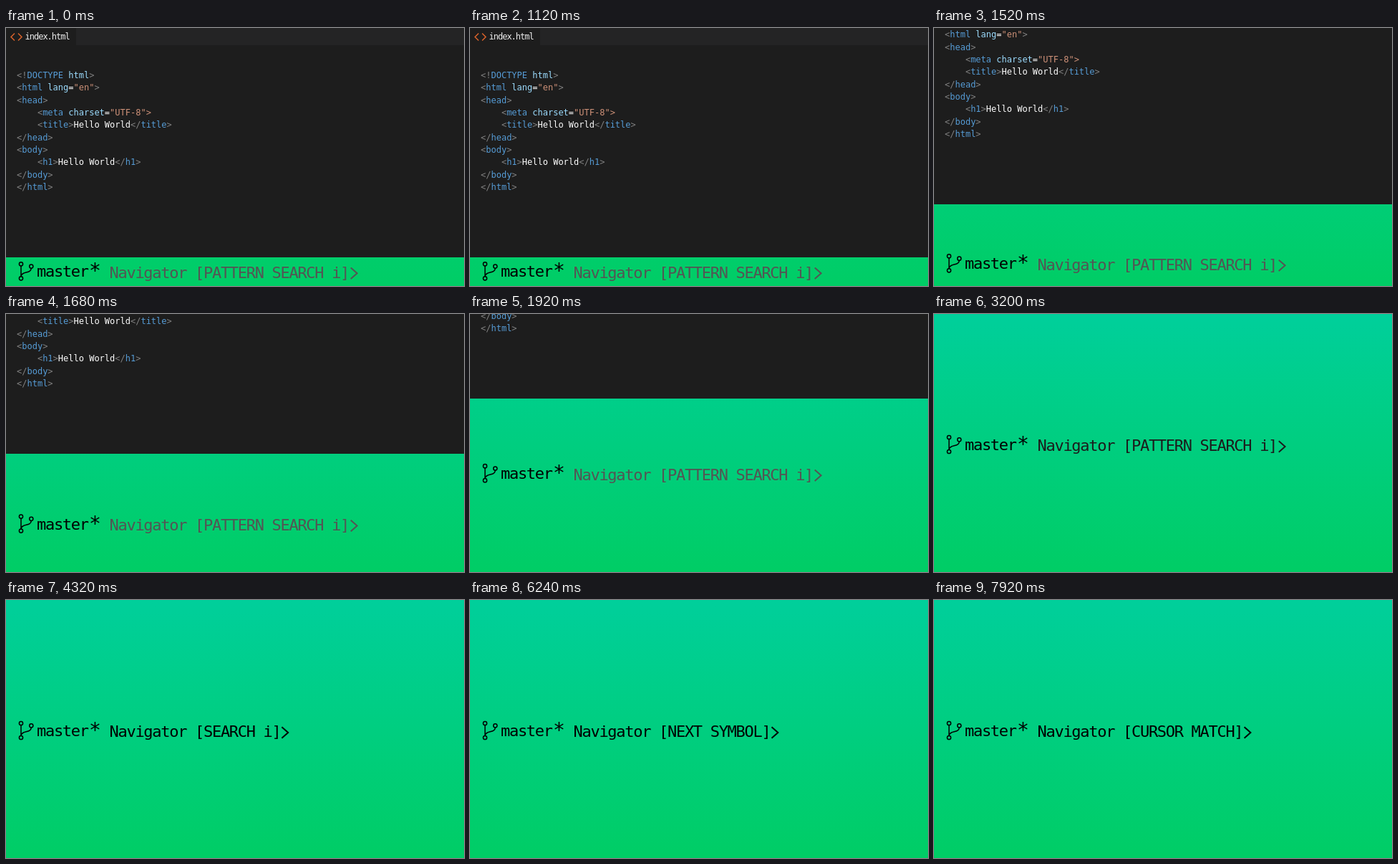
These frames come from a looping animation (640x360 px, 8000 ms). An HTML page:

```html
<!DOCTYPE html>
<html lang="en">
<head>
<meta charset="UTF-8">
<title>Editor status bar</title>
<style>
  html, body { margin: 0; width: 100%; height: 100%; overflow: hidden; background: #00cd65; }
  svg { display: block; width: 640px; height: 360px; }
  text { font-family: "DejaVu Sans Mono", monospace; white-space: pre; }
  .code { font-size: 12px; }
  .tab { font-size: 12px; letter-spacing: -1px; fill: #f0f0f0; }
  .label { font-size: 22px; letter-spacing: -1.3px; }
  .star { font-size: 28px; text-anchor: middle; }
  .line { fill: none; stroke-width: 1.5; }
  .p { fill: #808080; }
  .t { fill: #569cd6; }
  .a { fill: #9cdcfe; }
  .s { fill: #ce9178; }
  .w { fill: #fff; }
</style>
</head>
<body>
<svg viewBox="0 0 640 360">
  <defs>
    <linearGradient id="sky" x1="0" y1="0" x2="0" y2="1">
      <stop offset="0" stop-color="#00cf9b"/>
      <stop offset="1" stop-color="#00cd65"/>
    </linearGradient>
  </defs>
  <rect width="640" height="360" fill="url(#sky)"/>

  <g id="editor">
    <rect width="640" height="320" fill="#1d1d1d"/>
    <rect x="98" width="542" height="24" fill="#242425"/>
    <path class="line" stroke="#d9622b" d="M12 7.5L7 12.5l5 5M17 7.5l5 5l-5 5"/>
    <text class="tab" x="26.5" y="16">index.html</text>
    <g id="code"></g>
  </g>

  <g id="status">
    <g class="line" stroke="#000">
      <circle cx="21" cy="172" r="2.6"/>
      <circle cx="21" cy="192" r="2.6"/>
      <circle cx="35.3" cy="175.3" r="2.6"/>
      <path d="M21 174.6V189.4M35.3 178C35 186 22 181.5 21 189"/>
    </g>
    <text class="label" x="43" y="190">master</text>
    <text class="star" x="124.5" y="191">*</text>
    <text class="label" id="mode" x="144.6" y="191.3"></text>
    <path id="arrow" fill="none" stroke-width="2" d="M1 177.3l8.8 7.7l-8.8 7.7"/>
  </g>
</svg>
<script>
const LOOP = 8000, STEP = 80;
const $ = id => document.getElementById(id);

// Each run is a colour class letter followed by its text; the leading digit is the indent.
const lines = [
  '0~p<!~tDOCTYPE~a html~p>',
  '0~p<~thtml~a lang~w=~s"en"~p>',
  '0~p<~thead~p>',
  '4~p<~tmeta~a charset~w=~s"UTF-8">',
  '4~p<~ttitle~p>~wHello World~p</~ttitle~p>',
  '0~p</~thead~p>',
  '0~p<~tbody~p>',
  '4~p<~th1~p>~wHello World~p</~th1~p>',
  '0~p</~tbody~p>',
  '0~p</~thtml~p>'
];

const modes = [
  [0, 'PATTERN SEARCH i'],
  [3600, 'SEARCH i'],
  [5440, 'NEXT SYMBOL'],
  [7200, 'CURSOR MATCH']
];

function add(parent, tag, attrs, text = '') {
  const el = document.createElementNS('http://www.w3.org/2000/svg', tag);
  for (const key in attrs) el.setAttribute(key, attrs[key]);
  el.textContent = text;
  return parent.appendChild(el);
}

lines.forEach((line, row) => {
  const [indent, ...runs] = line.split('~');
  const text = add($('code'), 'text', { class: 'code', x: 15 + indent * 7.225, y: 70 + row * 17.35 });
  for (const run of runs) add(text, 'tspan', { class: run[0] }, run.slice(1));
});

const ramp = (t, start, length) => Math.min(1, Math.max(0, (t - start) / length));
const ease = u => (1 - Math.cos(Math.PI * u)) / 2;
const shift = (el, x, y) => el.setAttribute('transform', `translate(${x} ${y})`);

function draw(t) {
  shift($('editor'), 0, -Math.round(320 * ramp(t, 1290, 1000)));
  shift($('status'), 0, 157.3 * (1 - ease(ramp(t, 1382, 812))));

  const mode = modes.filter(m => m[0] <= t).pop()[1];
  const label = `Navigator [${mode}]`;
  if ($('mode').textContent !== label) $('mode').textContent = label;
  shift($('arrow'), 384.4 + 12.05 * (mode.length - 8), 0);

  const grey = Math.round(84 * (1 - ramp(t, 3040, 240)));
  const ink = `rgb(${grey},${grey},${grey})`;
  $('mode').setAttribute('fill', ink);
  $('arrow').setAttribute('stroke', ink);
}

const begin = performance.now();
function tick() {
  const t = (performance.now() - begin) % LOOP;
  draw(Math.floor(t / STEP) * STEP);
  requestAnimationFrame(tick);
}
tick();
</script>
</body>
</html>
```
